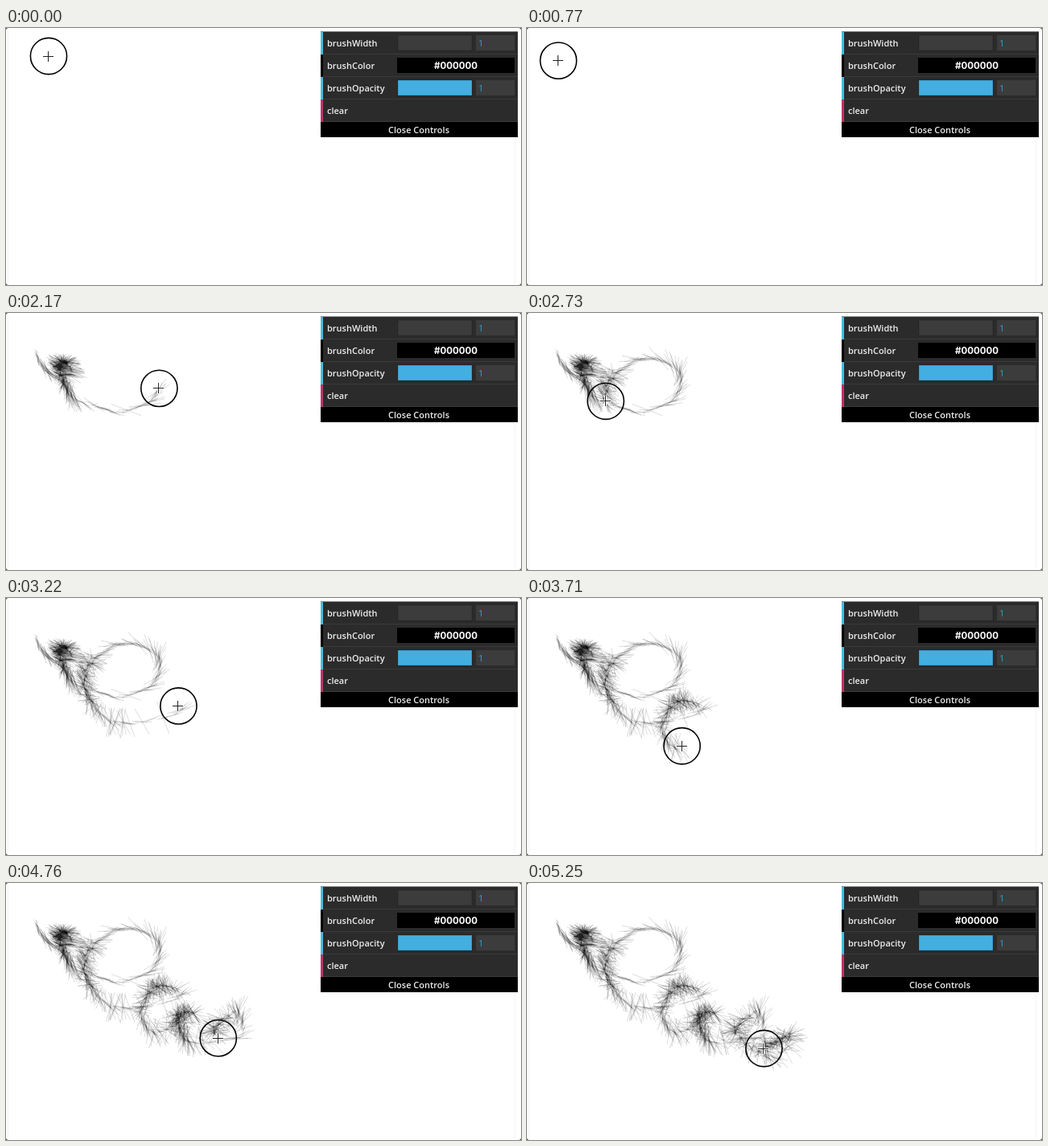
Animation, 640 px wide and 320 px high, one loop 5.32 s. Source, as an HTML page with a canvas:

```html
<!DOCTYPE html>
<html lang="en">
<head>
<meta charset="utf-8">
<title>Fur brush</title>
<style>
  html, body { margin: 0; width: 100%; height: 100%; overflow: hidden; background: #fff; }
  canvas, svg { position: absolute; left: 0; top: 0; width: 640px; height: 320px; display: block; }
  text { font: 600 11px "Open Sans", "Noto Sans", sans-serif; fill: #eee; }
  .value { font-weight: 400; fill: #2fa1d6; }
  .hex { font: 700 11.5px Inter, sans-serif; fill: #fff; }
  .mid { text-anchor: middle; }
</style>
</head>
<body>
<canvas id="fur" width="640" height="320"></canvas>
<svg viewBox="0 0 640 320">
  <path d="M2.5 2V318M632.5 137V318" stroke="#f3f3f3"/>
  <path d="M0 0h2l-2 2zM640 0h-2l2 2zM0 320h2l-2-2zM640 320h-2l2-2z" fill="#555"/>
  <g id="panel"></g>
  <circle id="ring" r="22.6" fill="none" stroke="#000" stroke-width="1.6"/>
  <g id="cross" fill="none">
    <path d="M-7 0H7M0-7V7" stroke="#fff" stroke-width="3"/>
    <path d="M-6.5 0H6.5M0-6.5V6.5" stroke="#222"/>
  </g>
</svg>
<script>
const LOOP = 5320, FRAME = 70, LAST = 5250;
const PRESS = 850, STEP = 24, REACH = 2000;

// Pointer positions at even intervals, joined by a smooth curve
const BEAT = 175;
const way = [
  [53, 35], [61, 47], [69, 53], [44, 41], [42, 39.5], [36, 46], [48, 71], [80, 78],
  [76, 62], [66, 65], [80, 101], [131, 121], [182, 108], [189, 71], [146, 56],
  [102, 85], [103, 126], [140, 156], [219, 142], [189, 128], [168, 155], [184, 186],
  [232, 162], [214, 166], [225.3, 195.5], [290, 192], [288, 160], [259, 186],
  [305, 219], [328, 190], [294.5, 206]
];

const $ = id => document.getElementById(id);

function pointer(t) {
  const i = Math.min(Math.floor(t / BEAT), way.length - 2), u = t / BEAT - i;
  const at = n => way[Math.max(0, Math.min(n, way.length - 1))];
  const [p, a, b, q] = [at(i - 1), at(i), at(i + 1), at(i + 2)];
  return [0, 1].map(k => a[k] + u / 2 * (b[k] - p[k] +
    u * (2 * p[k] - 5 * a[k] + 4 * b[k] - q[k] +
    u * (3 * (a[k] - b[k]) + q[k] - p[k]))));
}

let seed = 7;
function random() {
  seed = (seed * 16807) % 2147483647;
  return seed / 2147483647;
}
const jitter = size => (random() * 2 - 1) * size;

// Each new point grows hairs aimed at its earlier neighbours.
function growHairs() {
  const points = [], hairs = [];
  for (let t = PRESS; t <= LAST; t += STEP) {
    const [x, y] = pointer(t).map(v => v + jitter(1.8));
    for (const [px, py] of points) {
      const dx = px - x, dy = py - y, d = dx * dx + dy * dy;
      if (d < REACH && random() > d / REACH) {
        const turn = Math.atan2(dy, dx) + jitter(0.25), half = Math.sqrt(d) / 2;
        const hx = half * Math.cos(turn), hy = half * Math.sin(turn);
        const cx = x + jitter(1), cy = y + jitter(1);
        hairs.push([t, cx + hx, cy + hy, cx - hx, cy - hy]);
      }
    }
    points.push([x, y]);
  }
  return hairs;
}

const hairs = growHairs();
const ctx = $("fur").getContext("2d");
ctx.strokeStyle = "rgba(0,0,0,0.14)";

function drawFur(t) {
  ctx.clearRect(0, 0, 640, 320);
  for (const [born, x1, y1, x2, y2] of hairs) {
    if (born > t) break;
    ctx.beginPath();
    ctx.moveTo(x1, y1);
    ctx.lineTo(x2, y2);
    ctx.stroke();
  }
}

function buildPanel() {
  const rect = (x, y, w, h, fill, more = "") =>
    `<rect x="${x}" y="${y}" width="${w}" height="${h}" fill="${fill}" ${more}/>`;
  const text = (x, y, s, cls = "") => `<text x="${x}" y="${y}" class="${cls}">${s}</text>`;
  const rows = [
    ["brushWidth", "#45bde0", "#3c3c3c"],
    ["brushColor", "#000"],
    ["brushOpacity", "#45bde0", "#43aee0"],
    ["clear", "#bd3568"]
  ];
  let out = rect(391, 4.5, 245, 131.5, "#000");
  rows.forEach(([name, edge, bar], i) => {
    const y = 5 + 28 * i;
    out += rect(391, y, 245, 28, "#2b2b2b") + rect(394, y + 27, 242, 1, "#3a3a3a") +
      rect(391, y, 3, 28, edge) + text(399, y + 17.5, name);
    if (bar) out += rect(487, y + 4, 92, 19, bar, 'stroke="#000" stroke-opacity=".2"') +
      rect(584, y + 4, 48, 19, "#3c3c3c") + text(587, y + 17.5, "1", "value");
  });
  out += rect(486, 37, 146, 19, "#000") + text(559, 50.5, "#000000", "hex mid") +
    rect(391, 117, 245, 19, "#000") + text(513, 130.5, "Close Controls", "mid");
  $("panel").innerHTML = out;
}

function render(t) {
  const [x, y] = pointer(t);
  const snap = v => Math.floor(v) + 0.5;
  $("ring").setAttribute("transform", `translate(${x} ${y})`);
  $("cross").setAttribute("transform", `translate(${snap(x - 0.6)} ${snap(y)})`);
  drawFur(t);
}

let shown = -1;
const start = performance.now();
function tick() {
  const now = (performance.now() - start) % LOOP;
  const t = Math.floor(now / FRAME) * FRAME;
  if (t !== shown) render(shown = t);
  requestAnimationFrame(tick);
}

buildPanel();
tick();
</script>
</body>
</html>
```
